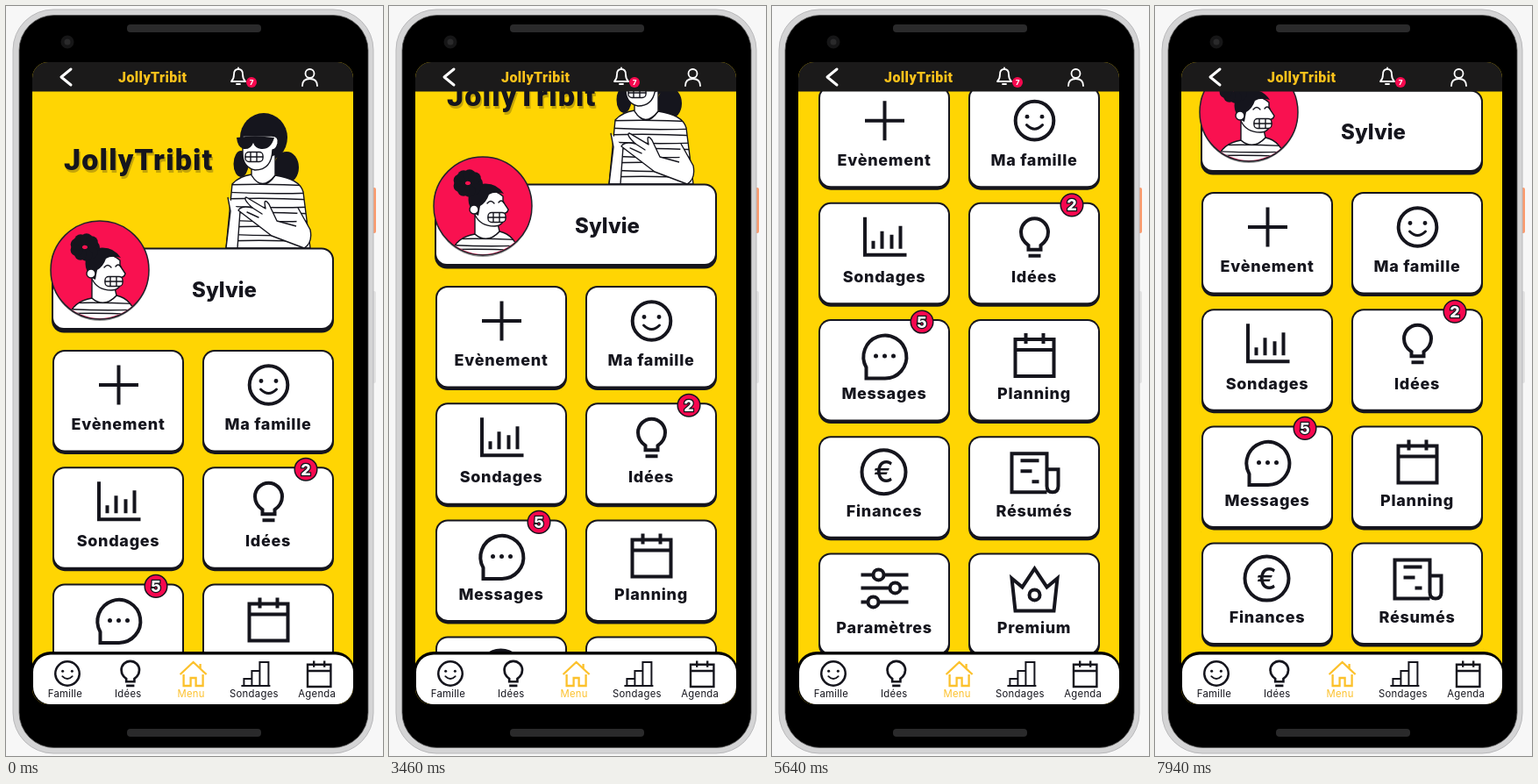
These frames come from a looping animation (430 by 855 pixels, 8 s). An HTML page:

```html
<!DOCTYPE html>
<html lang="fr">
<head>
<meta charset="utf-8">
<style>
html, body { margin: 0; width: 100%; height: 100%; overflow: hidden; background: #f7f7f7; }
svg { display: block; width: 430px; height: 855px; }
text { font-family: Inter, "Open Sans", sans-serif; text-anchor: middle; fill: #15151d; }
.line { fill: none; stroke: #15151d; stroke-width: 4; }
.thin { fill: none; stroke: #15151d; stroke-width: 1.4; stroke-linecap: round; }
.white { fill: #fff; stroke: #15151d; stroke-width: 1.4; stroke-linejoin: round; }
.ink { fill: #15151d; }
.dark { fill: #2a2a2b; }
.pink { fill: #f6084f; }
.label { font-size: 18px; font-weight: 800; letter-spacing: .7px; }
.nav { font-size: 11.3px; letter-spacing: .3px; }
.brand { font-family: Roboto, sans-serif; font-weight: 800; text-anchor: start; }
.badge { font-size: 18px; font-weight: 800; fill: #fff; stroke: #15151d; stroke-width: 2.5; paint-order: stroke; }
</style>
</head>
<body>
<svg viewBox="0 0 430 855">
  <defs>
    <clipPath id="screen"><rect x="30" y="64" width="366" height="732" rx="18"/></clipPath>
    <clipPath id="view"><rect x="30" y="97" width="366" height="660"/></clipPath>
    <clipPath id="disc"><circle cx="107" cy="301" r="55"/></clipPath>
    <path id="top" d="M258 203Q266 194 280 192Q293 214 307 193Q335 197 339 212L347 276H251Z"/>
    <path id="shirt" d="M70 359Q74 337 98 333Q112 345 126 330Q145 334 150 359Z"/>
    <clipPath id="inTop"><use href="#top"/></clipPath>
    <clipPath id="inShirt"><use href="#shirt"/></clipPath>
    <g id="grin">
      <rect class="white" x="-10" y="-5.500" width="20" height="11" rx="4"/>
      <path class="thin" d="M-10 0H10M-4-5V5M3-5V5"/>
    </g>
    <g id="smile">
      <circle class="line" r="21.800"/>
      <path class="line" stroke-linecap="round" style="stroke-width:3" d="M-9 5Q0 14 9 5"/>
      <circle class="ink" cx="-8.500" cy="-4.500" r="2.400"/><circle class="ink" cx="8.500" cy="-4.500" r="2.400"/>
    </g>
    <path id="bulb" class="line" d="M-7 14V9Q-15.500 3-15.500-6A15.500 15.500 0 0 1 15.500-6Q15.500 3 7 9V14ZM-7 21H7"/>
    <path id="cal" class="line" d="M-22-17H22V25H-22ZM-22-5H22M-10-24V-12M10-24V-12"/>
  </defs>

  <rect x="417" y="207" width="5" height="52" rx="2" fill="#fb9a6c"/>
  <rect x="417" y="325" width="5" height="105" rx="2" fill="#e2e2e3"/>
  <rect x="8" y="4" width="411" height="848" rx="46" fill="#d4d4d5" stroke="#b9b9bb"/>
  <rect x="15" y="10.500" width="398" height="835" rx="40" stroke="#555" stroke-width=".8"/>
  <rect class="dark" x="138" y="21" width="153" height="9" rx="4"/>
  <rect class="dark" x="138" y="824" width="153" height="9" rx="4"/>
  <circle cx="70" cy="41" r="5.500" stroke="#161617" stroke-width="4" class="dark"/>

  <g clip-path="url(#screen)">
    <rect x="30" y="64" width="366" height="732" fill="#ffd503"/>
    <g clip-path="url(#view)"><g id="page">
      <text class="brand" x="67.500" y="190" font-size="34" letter-spacing="1.2" fill-opacity=".25">JollyTribit</text>
      <text class="brand" x="66" y="187" font-size="34" letter-spacing="1.2">JollyTribit</text>

      <!-- Woman with sunglasses -->
      <ellipse class="ink" cx="268" cy="180" rx="8.500" ry="15"/>
      <ellipse class="ink" cx="320" cy="184" rx="14" ry="18"/>
      <ellipse class="ink" cx="294" cy="150" rx="27" ry="28"/>
      <use href="#top" class="white"/>
      <path id="topLines" class="thin" clip-path="url(#inTop)"/>
      <path class="white" d="M280 180V193Q292 212 307 193V170"/>
      <path class="white" d="M270 148H303Q312 148 310 157Q308 164 304 164Q303 187 284 187Q270 184 270 168Z"/>
      <path class="ink" d="M263 150Q284 147 306 150Q302 164 291 163Q284 162 282 156Q279 164 271 163Q264 161 263 150Z"/>
      <use href="#grin" x="283" y="172"/>
      <path class="white" d="M253 218L256 234L251 276H264L267 234M333 230L347 255Q350 270 340 276L303 262L265 233Q268 227 281 230Q270 220 274 218L296 231Q293 217 300 226L309 245L331 251"/>
      <path class="thin" d="M275 235L288 241M281 230L292 237"/>

      <rect class="ink" x="52" y="275.500" width="322" height="97" rx="14"/>
      <rect x="54" y="277.500" width="318" height="89.500" rx="12" fill="#fff"/>
      <text x="249" y="332" font-size="24" font-weight="800">Sylvie</text>

      <!-- Avatar -->
      <circle cx="107" cy="303" r="56" opacity=".4"/>
      <circle cx="107" cy="301" r="56" fill="#f91150" stroke="#22222a" stroke-width="1.500"/>
      <g clip-path="url(#disc)">
        <use href="#shirt" class="white"/>
        <path id="shirtLines" class="thin" clip-path="url(#inShirt)"/>
        <path class="white" d="M98 333V312H122L126 330Q112 345 98 333Z"/>
        <path class="white" d="M98 292Q114 276 130 290V296L136 305Q135 309 132 309Q132 324 120 324Q104 324 98 311Z"/>
        <path class="ink" d="M91 298Q88 280 104 276Q122 273 131 287Q120 284 114 288Q111 297 104 301L102 312Q94 310 91 298Z"/>
        <g id="bun" class="ink"></g>
        <circle class="white" cx="97" cy="305" r="5"/>
        <path class="thin" d="M112 298Q116 293 120 298M125 297Q128 293 131 297"/>
        <use href="#grin" x="123" y="314"/>
      </g>
      <g id="cards"></g>
    </g></g>

    <rect x="30" y="64" width="366" height="33.500" fill="#1b1a1a"/>
    <text class="brand" x="128" y="87" font-size="16" letter-spacing=".4" style="fill:#fcc21b">JollyTribit</text>
    <g fill="none" stroke="#fff" stroke-width="1.800" stroke-linecap="round" stroke-linejoin="round">
      <path d="M74 72L63 81L74 90" stroke-width="3"/>
      <path d="M257 86Q260 83 260 78Q260 72 265 72Q270 72 270 78Q270 83 273 86ZM265 72V70.500M263 89H267"/>
      <circle cx="346.500" cy="77" r="5"/>
      <path d="M338 91Q338 83 346.500 83Q355 83 355 91"/>
    </g>
    <circle class="pink" cx="280" cy="87" r="6"/>
    <text x="280" y="90" font-size="8" font-weight="800" style="fill:#fff">7</text>

    <rect x="28" y="736" width="370" height="70" rx="23"/>
    <rect x="31" y="739.500" width="365" height="56.500" rx="20" fill="#fff"/>
    <g id="nav"></g>
  </g>
  <circle id="touch" r="30" fill="#b4b4b4" fill-opacity=".74" stroke="#909090" stroke-opacity=".55"/>
</svg>
<script>
const $ = id => document.getElementById(id);
const range = (n, f) => Array.from({length: n}, (_, i) => f(i)).join('');
const line = d => `<path class="line" d="${d}"/>`;
const ring = (x, y, r = 6) => `<circle class="line" cx="${x}" cy="${y}" r="${r}" style="fill:#fff"/>`;
const use = (id, size = 1) => `<use href="#${id}" transform="scale(${size})"/>`;

// Label, icon centred on its card, badge
const cards = [
  ['Evènement', line('M-22.500 0H22.500M0-22.500V22.500')],
  ['Ma famille', use('smile')],
  ['Sondages', line('M-22.500-23V20H25M-13 13V4M-3 13V-7M8 13V-3M18 13V-13')],
  ['Idées', use('bulb'), 2],
  ['Messages', line('M-21 27.500V15A24.500 24.500 0 1 1 0 27.500Z') +
    range(3, i => `<circle class="ink" cx="${i * 10 - 10}" cy="2" r="2.500"/>`), 5],
  ['Planning', use('cal')],
  ['Finances', ring(-1, 1, 25) + '<text y="13" x="-1" font-size="34" font-weight="500">€</text>'],
  ['Résumés', line('M14 24H-26V-20H14V17Q14 24 20.500 24Q27 24 27 17V-2H14M-16-12H5M-16 0H-3M-3 12H5')],
  ['Paramètres', line('M-27-15H27M-27 0H27M-27 16H27') + ring(-7, -15) + ring(12, 0) + ring(-13, 16)],
  ['Premium', line('M-26-11L-14-1L0-22L14-1L26-11L22 26H-22Z') + ring(0, 8)],
];
$('cards').innerHTML = cards.map(([label, icon, badge], i) => `
  <g transform="translate(${128 + i % 2 * 171} ${393 + (i >> 1) * 133.2})">
    <rect class="ink" x="-75" y="-1" width="150" height="119" rx="14"/>
    <rect x="-73" y="1" width="146" height="112.500" rx="12" fill="#fff"/>
    <g transform="translate(.500 39)">${icon}</g>
    <text class="label" y="90.300">${label}</text>
    ${badge ? `<circle class="pink" cx="43" cy="2" r="12.800" stroke="#15151d" stroke-width="1.500"/>
      <text class="badge" x="43" y="8.500">${badge}</text>` : ''}
  </g>`).join('');

const tabs = [
  ['Famille', use('smile', .63)],
  ['Idées', use('bulb', .66)],
  ['Menu', '<path d="M-15 1L0-13L15 1M-11 1V14H-3V5H3V14H11V1M8-6V-11" fill="none" stroke="#fcc12c" stroke-width="2.300"/>'],
  ['Sondages', '<path class="line" style="stroke-width:2" d="M-17 14H16M-14 14V6H-5M-5 14V-3H4M4 14V-13H14V14"/>'],
  ['Agenda', use('cal', .6)],
];
$('nav').innerHTML = tabs.map(([label, icon], i) => `
  <g transform="translate(${67.5 + i * 71.8} 761)">
    <g transform="translate(2.500 0)">${icon}</g>
    <text class="nav" y="27" ${i === 2 ? 'style="fill:#fcc12c"' : ''}>${label}</text>
  </g>`).join('');

const stripes = (x, y, w, gap, n) =>
  range(n, i => `M${x} ${y + i * gap}q${w / 2} ${i % 2 ? 3 : -2} ${w} 1`);
$('topLines').setAttribute('d', stripes(248, 204, 102, 8, 10));
$('shirtLines').setAttribute('d', stripes(60, 339, 95, 6, 4));
$('bun').innerHTML = range(9, i =>
  `<circle cx="${90 + 10 * Math.cos(i * .7)}" cy="${275 + 9 * Math.sin(i * .7)}" r="7"/>`);

const clamp = u => Math.min(1, Math.max(0, u));
const smooth = u => u * u * (3 - 2 * u);
const easeOut = u => 1 - (1 - u) ** 1.5;

// Start, duration, distance
const scrolls = [[2830, 1340, 160], [4973, 866, 163], [7520, 650, -200]];
// Shown, hidden, travel time, from, to
const touches = [
  [1140, 2560, 990, [424, 849], [345, 717]],
  [4240, 4860, 370, [346, 704], [328.5, 680]],
  [5950, 6560, 400, [301, 441], [317, 459]],
  [6560, 7400, 610, [310, 458], [330, 398]],
];

function draw() {
  const t = performance.now() % 8000;
  const y = scrolls.reduce((sum, [start, time, way]) => sum + way * smooth(clamp((t - start) / time)), 0);
  $('page').setAttribute('transform', `translate(0 ${-y})`);

  const touch = touches.find(([shown, hidden]) => t >= shown && t < hidden);
  $('touch').setAttribute('visibility', touch ? 'visible' : 'hidden');
  if (touch) {
    const [shown, , time, from, to] = touch;
    const u = easeOut(clamp((t - shown) / time));
    $('touch').setAttribute('transform', `translate(${from.map((v, i) => v + (to[i] - v) * u)})`);
  }
  requestAnimationFrame(draw);
}
draw();
</script>
</body>
</html>
```
